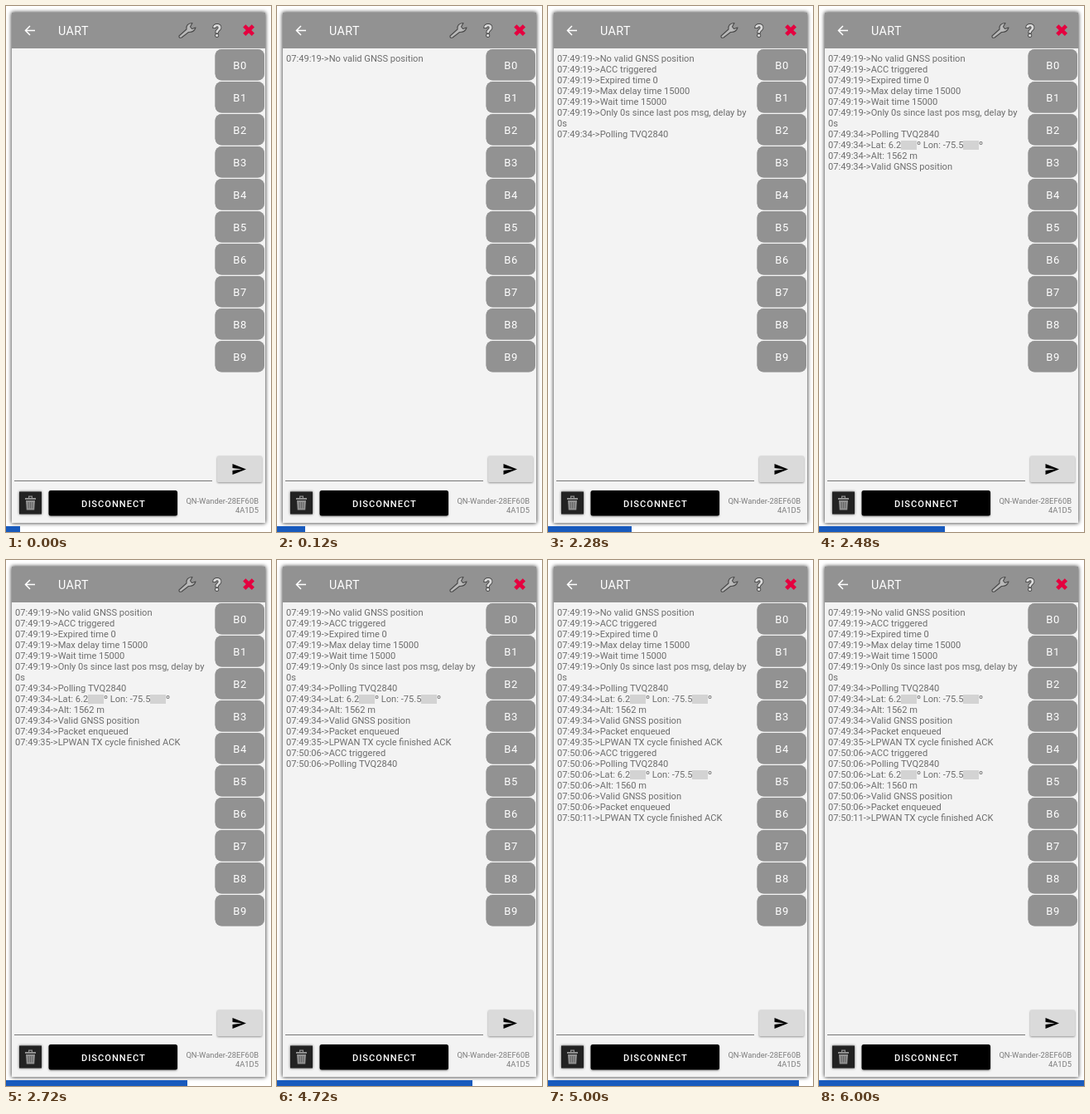
These frames come from a looping animation (320x633 px, 7 s). An HTML page:

```html
<!DOCTYPE html>
<html lang="en">
<head>
<meta charset="utf-8">
<title>Serial log</title>
<style>
html, body { margin: 0; width: 100%; height: 100%; overflow: hidden; background: #fff; }
svg { display: block; width: 320px; height: 633px; font-family: Roboto, sans-serif; }
.phone { filter: drop-shadow(0 0 2.5px rgba(0,0,0,.55)) drop-shadow(0 0 2px rgba(0,0,0,.4)); }
.soft { filter: drop-shadow(0 1px 1.2px rgba(0,0,0,.4)); }
.key { filter: drop-shadow(0 .5px .6px rgba(0,0,0,.3)); }
.glow { filter: drop-shadow(0 0 1.5px rgba(0,0,0,.65)); }
#log { font-size: 11.1px; fill: #6c6c6c; }
#keys { font-size: 13px; letter-spacing: .6px; text-anchor: middle; }
.name { font-size: 9.4px; fill: #7c7c7c; text-anchor: end; }
</style>
</head>
<body>
<svg viewBox="0 0 320 633">
  <rect class="phone" x="7" y="8" width="306" height="614" fill="#f3f3f3"/>
  <rect x="7" y="8" width="306" height="43" fill="#929292"/>

  <path d="M35 29.5H24M29 24l-5.5 5.5L29 35" fill="none" stroke="#fff" stroke-width="1.5"/>
  <text x="63" y="35" font-size="14.3" letter-spacing=".4" fill="#fff">UART</text>
  <path d="M209 36L218 28Q217 21 225 20.5L222.5 25L224.5 27.5L229 26Q227 32 220.5 31.5L212 38Q208.5 39 209 36Z"
        fill="#b9b9b9" stroke="#484848" stroke-width="1.1" stroke-linejoin="round"/>
  <text x="255" y="37" font-size="21" font-weight="700" text-anchor="middle" fill="#dcdcdc"
        stroke="#484848" stroke-width="1.8" paint-order="stroke">?</text>
  <path d="M287.8 23.8l10.6 10.6m0-10.6l-10.6 10.6" stroke="#e5003f" stroke-width="4.6"/>

  <g id="keys"></g>
  <g id="log"></g>

  <path d="M10 571.5H249" stroke="#777"/>
  <rect class="soft" x="255" y="541.5" width="54" height="31.5" rx="1.5" fill="#dadada"/>
  <path d="M273.5 551L290 557.5L273.5 564V559L285 557.5L273.5 556Z" fill="#000"/>

  <rect class="glow" x="16" y="584.5" width="27" height="27" fill="#222"/>
  <g fill="#909090">
    <path d="M23 592h13v2H23zM27 592v-2.5h5v2.5h-1.2v-1.2h-2.6v1.2z"/>
    <path d="M24 595h11l-.8 11.5h-9.4z"/>
  </g>
  <path d="M27.2 597v7.5M29.5 597v7.5M31.8 597v7.5" stroke="#555" stroke-width=".8"/>

  <rect class="soft" x="51.5" y="583" width="155.5" height="30.5" rx="2.5" fill="#000"/>
  <text x="91" y="602.7" font-size="11.1" font-weight="500" letter-spacing=".99" fill="#fff">DISCONNECT</text>
  <text class="name" x="305" y="598.5">QN-Wander-28EF60B</text>
  <text class="name" x="305" y="609.5">4A1D5</text>

  <rect id="bar" y="626" width="17" height="7" fill="#185abd"/>
</svg>
<script>
const LOOP = 7000, WIDTH = 320;
const $ = id => document.getElementById(id);

function add(parent, tag, attrs, text = '') {
  const el = document.createElementNS('http://www.w3.org/2000/svg', tag);
  for (const k in attrs) el.setAttribute(k, attrs[k]);
  el.textContent = text;
  return parent.appendChild(el);
}

for (let i = 0; i < 10; i++) {
  const y = 52 + 39 * i;
  add($('keys'), 'rect', { class: 'key', x: 252.5, y, width: 59.5, height: 37.5, rx: 8, fill: '#929292' });
  add($('keys'), 'text', { x: 282.5, y: y + 23.5, fill: '#fff' }, 'B' + i);
}

// "#" marks a masked part of a coordinate
const fix = alt => ['Lat: 6.2#º Lon: -75.5#º', `Alt: ${alt} m`, 'Valid GNSS position', 'Packet enqueued'];
const stamp = (time, msgs) => msgs.map(m => `07:${time}->${m}`);
const lines = [
  ...stamp('49:19', ['No valid GNSS position', 'ACC triggered', 'Expired time 0', 'Max delay time 15000',
    'Wait time 15000', 'Only 0s since last pos msg, delay by']),
  '0s',
  ...stamp('49:34', ['Polling TVQ2840', ...fix(1562)]),
  ...stamp('49:35', ['LPWAN TX cycle finished ACK']),
  ...stamp('50:06', ['ACC triggered', 'Polling TVQ2840', ...fix(1560)]),
  ...stamp('50:11', ['LPWAN TX cycle finished ACK'])
];
const partX = [11, 118, 193];
const rows = lines.map((line, i) => {
  const g = add($('log'), 'g', {}), y = 67 + 13 * i;
  line.split('#').forEach((part, n) => {
    if (n) add(g, 'rect', { x: partX[n] - 19, y: y - 6.5 + 0.5, width: 19, height: 11, fill: '#d3d3d3', transform: 'translate(0 -3)' });
    add(g, 'text', { x: partX[n], y }, part);
  });
  return g;
});

// [start in ms, lines shown]
const steps = [
  [0, 0], [80, 1], [160, 3], [240, 5], [280, 7],
  [2280, 8], [2320, 9], [2400, 10], [2480, 11], [2520, 12], [2600, 12], [2640, 12], [2720, 13],
  [4720, 15], [4800, 16], [4880, 17], [4920, 19], [5000, 20], [6000, 20]
];

let shown = -1;
function draw(t) {
  const i = steps.filter(s => s[0] <= t).length - 1;
  if (i === shown) return;
  shown = i;
  rows.forEach((row, n) => row.setAttribute('visibility', n < steps[i][1] ? 'visible' : 'hidden'));
  $('bar').setAttribute('width', Math.round(WIDTH * (i + 1) / steps.length));
}

const start = performance.now();
function tick() {
  draw((performance.now() - start) % LOOP);
  requestAnimationFrame(tick);
}
tick();
</script>
</body>
</html>
```
